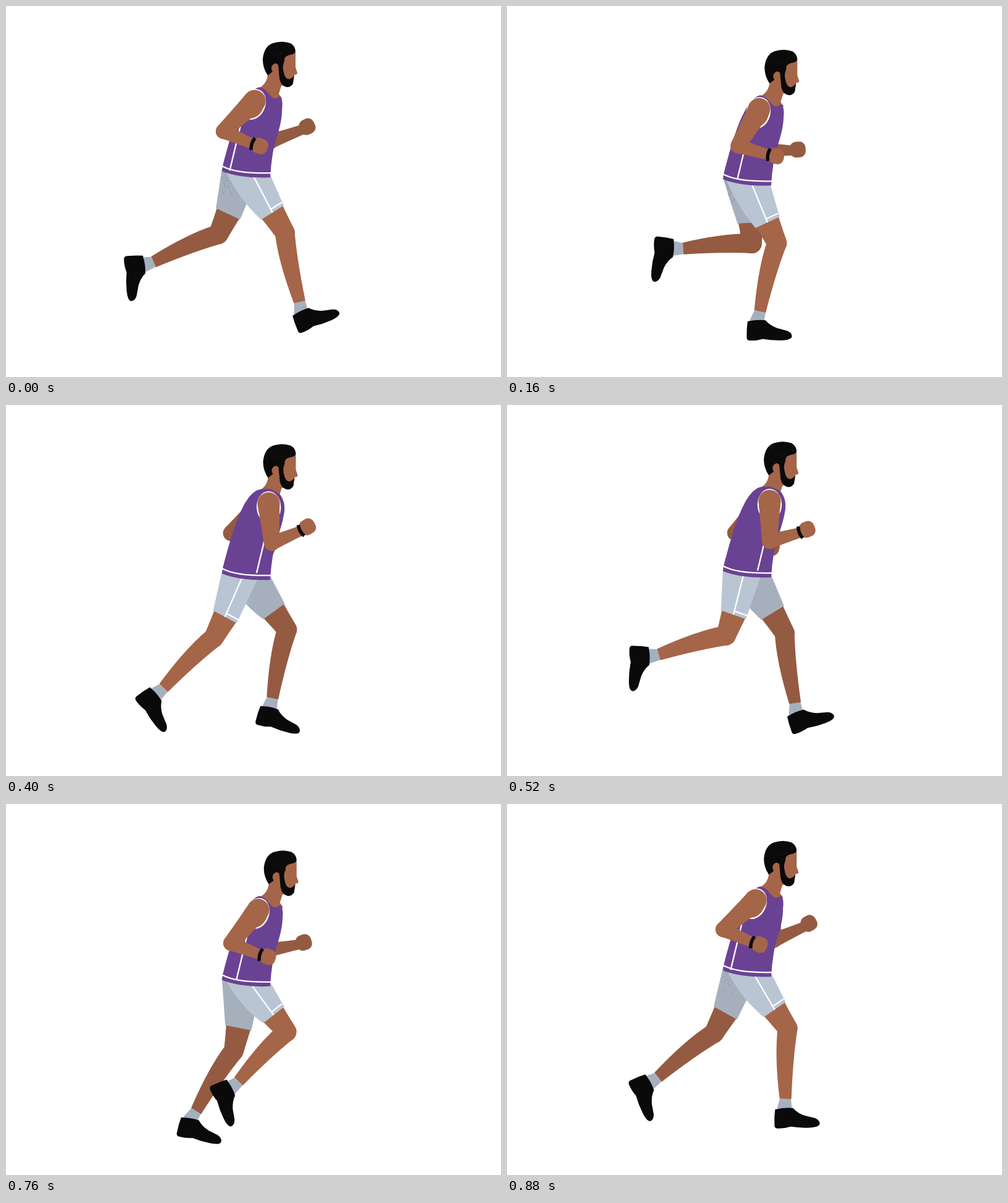
Recreate the animation shown at these times as an HTML page with a canvas. Size 800 by 600 pixels, loop 960 ms.

```html
<!DOCTYPE html>
<html lang="en">
<head>
<meta charset="utf-8">
<title>Runner</title>
<style>
  html, body { margin: 0; width: 100%; height: 100%; overflow: hidden; background: #fff; }
  canvas { display: block; width: 100vw; height: 100vh; }
</style>
</head>
<body>
<canvas id="stage" width="800" height="600"></canvas>
<script>
const ctx = document.getElementById('stage').getContext('2d');

const LOOP = 960, TICK = 40, STEP = 62.5, STRIDE = 15;

const NEAR = { skin: '#a56548', cloth: '#b9c5d3' };
const FAR = { skin: '#945b42', cloth: '#a6b0bd' };
const PURPLE = '#6a4293', BLACK = '#0a0a0a', SOCK = '#a5b0be', WHITE = '#fff';

// Leg angles in degrees, evenly spaced over one stride; both legs share them half a stride apart
const thighAngle = cycle([32, 28, 14.5, -11, -28, -25, -4, 18, 38, 36]);
const shinAngle = cycle([12, -8, -24, -32, -45, -67, -85, -79, -44, -12]);
const shoeAngle = cycle([-24, -4, 1, 11, 51, 84, 95, 87, 64, 13]);

const shoe = new Path2D('M-15 1Q0 -2 14 0Q20 8 32 13L49 18Q57 22 56 28Q54 33 40 33Q24 33 9 30Q-2 33 -13 32Q-18 31 -17 25Q-17 12 -15 1Z');
const face = new Path2D('M423 110Q423 126 408 134L420 160H438L446 150L441 143L445 130L464 122L466 112Q471 112 471 109L468 100L468 76L430 76Z');
const hair = new Path2D('M423 113Q415 101 415 87Q417 66 431 61Q446 56 460 61Q468 66 468 75Q466 79 458 80Q449 82 450 90Q446 98 449 108Q451 119 458 119Q464 117 466 112L464 126Q461 132 454 132Q444 130 442 118L440 96Q436 91 431 96Q427 101 431 107Z');

// Smooth periodic curve through evenly spaced values
function cycle(values) {
  const n = values.length, at = i => values[(i + n) % n];
  return step => {
    const x = step / STRIDE * n, i = Math.floor(x), u = x - i;
    const a = at(i), b = at(i + 1);
    const ma = (b - at(i - 1)) / 2, mb = (at(i + 2) - a) / 2;
    return a + u * (ma + u * (3 * (b - a) - 2 * ma - mb + u * (2 * (a - b) + ma + mb)));
  };
}

const wave = (step, peak, period = STRIDE) => Math.cos(2 * Math.PI * (step - peak) / period);
const random = i => { const v = Math.sin(i * 12.9898) * 43758.5453; return v - Math.floor(v); };
const radians = degrees => degrees * Math.PI / 180;
// Unit vector: 0 degrees hangs straight down, positive swings forward
const swing = degrees => [Math.sin(radians(degrees)), Math.cos(radians(degrees))];
const mix = (a, b, t) => [a[0] + (b[0] - a[0]) * t, a[1] + (b[1] - a[1]) * t];
const move = (p, d, s) => [p[0] + d[0] * s, p[1] + d[1] * s];
const side = d => [d[1], -d[0]];

function fill(color, path) {
  ctx.fillStyle = color;
  path ? ctx.fill(path) : ctx.fill();
}

function polygon(color, points) {
  ctx.beginPath();
  points.forEach(p => ctx.lineTo(...p));
  fill(color);
}

function stroke(width = 2.3, color = WHITE) {
  ctx.lineWidth = width;
  ctx.strokeStyle = color;
  ctx.stroke();
}

function line(a, b) {
  ctx.beginPath();
  ctx.moveTo(...a);
  ctx.lineTo(...b);
  stroke();
}

function disc(color, p, r) {
  ctx.beginPath();
  ctx.arc(...p, r, 0, 7);
  fill(color);
}

// Tapered limb along direction d; front and back set how far each side bulges
function limb(color, a, b, d, ra, rb, front = (ra + rb) / 2, back = front) {
  const n = side(d), m = mix(a, b, 0.4);
  ctx.beginPath();
  ctx.moveTo(...move(a, n, ra));
  ctx.quadraticCurveTo(...move(m, n, front), ...move(b, n, rb));
  ctx.lineTo(...move(b, n, -rb));
  ctx.quadraticCurveTo(...move(m, n, -back), ...move(a, n, -ra));
  fill(color);
}

function place(p, angle, draw) {
  ctx.save();
  ctx.translate(...p);
  ctx.rotate(angle);
  draw();
  ctx.restore();
}

function drawLeg(step, tone, bob) {
  const hipAngle = thighAngle(step), kneeAngle = shinAngle(step), bend = hipAngle - kneeAngle;
  const thigh = swing(hipAngle), shin = swing(kneeAngle), angle = radians(shoeAngle(step));
  const hip = [390, 270 + bob];
  const knee = move(hip, thigh, 118 - 0.18 * bend);
  const ankle = move(knee, shin, 116 - 0.05 * bend);
  const foot = move(ankle, swing(kneeAngle - 5), 15.5);
  const toe = [Math.cos(angle), Math.sin(angle)], heel = side(shin);

  polygon(SOCK, [move(ankle, heel, -9), move(ankle, heel, 9), move(foot, toe, 12), move(foot, toe, -12)]);
  limb(tone.skin, mix(hip, knee, 0.6), knee, thigh, 21, 16);
  disc(tone.skin, knee, 16);
  limb(tone.skin, knee, ankle, shin, 16, 9.5, 10, 20);
  place(foot, angle, () => fill(BLACK, shoe));
  drawShorts(step, tone, bob, thigh, mix(hip, knee, 0.67));
}

function drawShorts(step, tone, bob, thigh, hem) {
  const across = side(thigh), forward = Math.max(0, thigh[0]);
  const front = move(hem, across, 21.5), back = move(hem, across, -21.5);
  const waist = [349 + (tone === NEAR ? 8 * forward : 0), 264 + bob];
  ctx.save();
  ctx.beginPath();
  ctx.moveTo(...waist);
  ctx.lineTo(417 + 19 * thigh[0], 274 + bob);
  ctx.lineTo(...front);
  ctx.lineTo(...back);
  ctx.quadraticCurveTo(...move(mix(waist, back, 0.5), [-16, 11], forward), ...waist);
  fill(tone.cloth);
  if (tone === NEAR) {
    line([390 - 8 * wave(step, 7), 272 + bob], hem);
    line(move(hem, thigh, -6), move(front, thigh, -6));
  } else {
    ctx.clip();
    const count = 120 * wave(step, 2 + STRIDE / 2);
    for (let i = 1; i <= count; i++) {
      const y = Math.pow(random(i), 1.4) * 38;
      disc('#7c8591', [346 + random(i + 200) * 22, 266 + bob + y], 0.6);
    }
  }
  ctx.restore();
}

function drawArm(step, shoulder, tone) {
  const pump = wave(step, 6.5);
  const upperAngle = -21.5 + 26.5 * pump, foreAngle = 80 + 24 * pump + 10 * pump * pump;
  const upper = swing(upperAngle), fore = swing(foreAngle);
  const elbow = move(shoulder, upper, 67.5 - 3 * pump);
  const wrist = move(elbow, fore, 49);

  if (tone === NEAR) drawArmhole(shoulder, upperAngle);
  disc(tone.skin, shoulder, 18);
  limb(tone.skin, shoulder, elbow, upper, 18, 12.5);
  disc(tone.skin, elbow, 12.5);
  limb(tone.skin, elbow, move(wrist, fore, 6), fore, 12, 8);
  place(wrist, radians(90 - foreAngle) - 0.1, () => {
    ctx.beginPath();
    ctx.roundRect(2, -13, 25.5, 25.5, 10);
    fill(tone.skin);
    if (tone === NEAR) {
      ctx.beginPath();
      ctx.moveTo(3, -10);
      ctx.quadraticCurveTo(-1, 0, 3, 10);
      stroke(5.5, BLACK);
    }
  });
}

function drawArmhole(shoulder, armAngle) {
  place(shoulder, -radians(armAngle) / 2, () => {
    ctx.beginPath();
    ctx.ellipse(0, 6, 18.5, 24.5, 0, 0, 7);
    fill(NEAR.skin);
    stroke();
  });
}

function drawHead(bob) {
  place([bob * 0.1, bob], 0, () => {
    fill(NEAR.skin, face);
    fill(BLACK, hair);
    for (let i = 1; i < 45; i++) {
      disc('#3a3a3a', [420 + random(i) * 42, 64 + random(i + 90) * 16 + random(i + 50) * 6], 0.4);
    }
  });
}

function drawShirt(bob, twist) {
  const open = Math.min(1, Math.max(0, 0.45 - 1.2 * twist));
  const seam = 384 + 23 * twist, chest = 448 + 2 * twist;
  place([0, bob], 0, () => {
    ctx.beginPath();
    ctx.moveTo(349, 268);
    ctx.lineTo(350, 260);
    ctx.bezierCurveTo(360, 222, 370, 186, 381, 164);
    ctx.quadraticCurveTo(391, 142, 404, 134);
    ctx.lineTo(409, 132);
    ctx.bezierCurveTo(426, 130 + 4 * open, 428, 130 + 30 * open, 443, 140 + 6 * open);
    ctx.quadraticCurveTo(chest + 2, 152, chest, 168);
    ctx.bezierCurveTo(446, 195, 436, 212, 431, 240);
    ctx.quadraticCurveTo(428, 258, 427, 278);
    ctx.quadraticCurveTo(380, 280, 349, 268);
    fill(PURPLE);
    line([seam + 18, 192], [seam, 267]);
    ctx.beginPath();
    ctx.moveTo(350, 260);
    ctx.quadraticCurveTo(372, 272, 428, 271);
    stroke();
  });
}

function drawRunner(step) {
  const opposite = (step + STRIDE / 2) % STRIDE;
  const twist = wave(step, 7);
  const bob = Math.min(17, 9.5 - 10.5 * wave(step, -0.2, STRIDE / 2));
  drawArm(opposite, [420 + 5 * wave(opposite, 6.5), 155 + bob], FAR);
  drawLeg(opposite, FAR, bob);
  drawLeg(step, NEAR, bob);
  drawHead(bob);
  drawShirt(bob, twist);
  drawArm(step, [413.5 + 12 * twist, 154.5 + bob], NEAR);
}

let start;
function render(now) {
  start ??= now;
  const tick = Math.floor((now - start) % LOOP / TICK) * TICK;
  ctx.fillStyle = WHITE;
  ctx.fillRect(0, 0, 800, 600);
  drawRunner(Math.floor(tick / STEP));
  requestAnimationFrame(render);
}
requestAnimationFrame(render);
</script>
</body>
</html>
```
